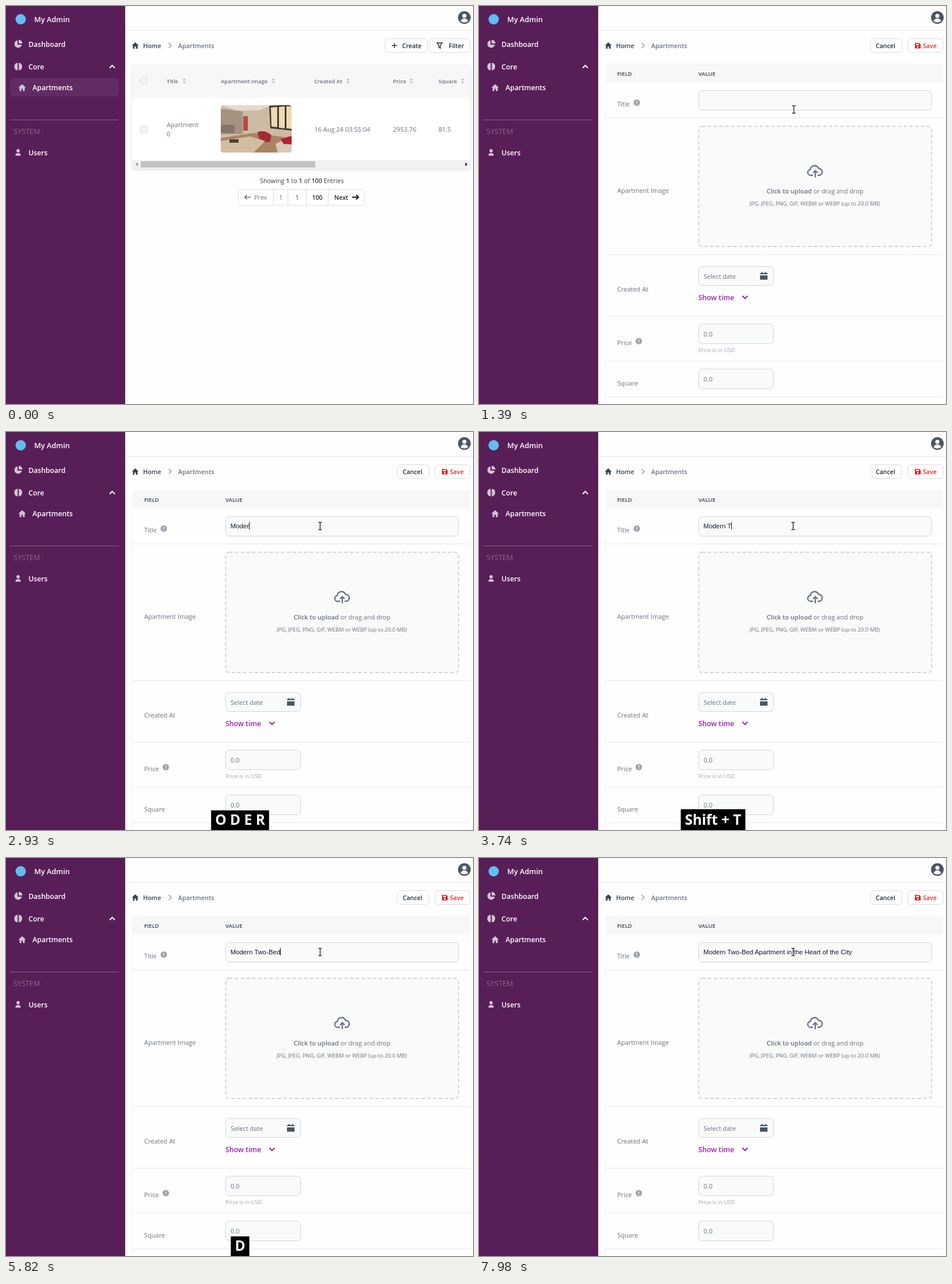
Recreate the animation shown at these times as an HTML page. Size 811 by 690 pixels, loop 8 s.

```html
<!DOCTYPE html>
<html lang="en">
<head>
<meta charset="utf-8">
<title>My Admin</title>
<style>
  html, body { margin: 0; width: 100%; height: 100%; overflow: hidden; background: #fefefe; }
  svg { display: block; }
  text { font: 11px "Open Sans", sans-serif; fill: #6b7280; white-space: pre; }
  .side text { font-size: 12.2px; font-weight: 600; fill: #fff; }
  .side .brand { font-size: 12.7px; }
  .side .section { font-size: 12.6px; font-weight: 500; fill: #8f628f; }
  .crumb { font-size: 10.9px; font-weight: 600; }
  .head text { font-size: 9.6px; font-weight: 600; }
  .dark, .dark text { fill: #374151; }
  .btn rect { fill: #fff; stroke: #d9dce1; }
  .btn text { font-size: 10.6px; font-weight: 600; fill: #1f2937; }
  .btn path { fill: none; stroke: #1f2937; stroke-width: 1.4; }
  .btn.red text { fill: #dc2626; }
  .btn.hover rect { fill: #f3f4f6; stroke: #d1d5db; stroke-width: 2; }
  .btn.hover text { fill: #a21caf; }
  .btn.hover path { stroke: #a21caf; }
  .strong { font-weight: 600; }
  .small { font-size: 9.45px; }
  .field { fill: #f9fafa; stroke: #d1d5db; }
  .lines { stroke: #eceef0; stroke-width: 1.5; }
  #title { font: 11.4px "Liberation Sans", Arial, sans-serif; fill: #111827; }
  #keyText { font-size: 24.5px; font-weight: 700; fill: #fff; text-anchor: middle; }
</style>
</head>
<body>
<svg width="811" height="690" viewBox="0 0 811 690">
  <defs>
    <g id="sort" fill="#c3c5ca"><path d="M-3-1 0-5 3-1zM-3 1 0 5 3 1z"/></g>
    <g id="info"><circle r="5.6" fill="#9ca3af"/><path d="M0-3V.8M0 2V3.3" stroke="#fff" stroke-width="1.4"/></g>
    <path id="house" d="M0-6-6.5 0h2v6h3.2V2h2.6v4h3.2V0h2z"/>
    <clipPath id="photoClip"><rect x="373" y="172" width="123" height="82" rx="5"/></clipPath>
    <filter id="shadow" x="-5%" y="-5%" width="110%" height="115%"><feDropShadow dx="0" dy="2" stdDeviation="2.5" flood-opacity=".14"/></filter>
  </defs>
  <rect width="811" height="690" fill="#fefefe"/>
  <path d="M207 42.5H811" stroke="#e5e7eb"/>
  <g transform="translate(796 20)">
    <circle r="11" fill="#4b5563"/>
    <circle cy="-3" r="3.6" fill="#fff"/><path d="M-6.5 6.2C-5-.2 5-.2 6.5 6.2Q0 11-6.5 6.2" fill="#fff"/>
  </g>

  <g class="side">
    <rect width="207" height="690" fill="#581e58"/>
    <rect id="active" x="7" y="125" width="189" height="32" rx="6" fill="#632b63"/>
    <circle cx="25.500" cy="23" r="9" fill="#62bdf0"/>
    <g fill="#d3c3d3">
      <path d="M20 59.500V67H27.500A6.500 6.500 0 1 1 20 59.500zM22 58.500A6.500 6.500 0 0 1 28.500 65H22z"/>
      <path d="M20.300 98.500V111.500C12.500 111.500 12.500 98.500 20.300 98.500zM22.300 98.500V111.500C30 111.500 30 98.500 22.300 98.500z"/>
      <use href="#house" x="28" y="141.500"/>
      <circle cx="21" cy="251" r="2.900"/><path d="M16.500 259.500V258Q16.500 255 21 255T25.500 258V259.500z"/>
    </g>
    <path d="M180 107.500 184.500 103 189 107.500" fill="none" stroke="#fff" stroke-width="2"/>
    <path d="M7 197.500H196" stroke="#8b5f8b"/>
    <text class="brand" x="49" y="27.700">My Admin</text>
    <text x="39" y="70.500">Dashboard</text>
    <text x="39" y="109.800">Core</text>
    <text x="46" y="146">Apartments</text>
    <text class="section" x="13" y="222">SYSTEM</text>
    <text x="39" y="258.500">Users</text>
  </g>

  <use href="#house" x="224.500" y="68.500" fill="#374151" transform="translate(22.450 6.850) scale(.9)"/>
  <text class="crumb dark" x="238" y="72.500">Home</text>
  <path d="M282.500 64 287 68.500 282.500 73" fill="none" stroke="#9ca3af" stroke-width="1.600"/>
  <text class="crumb" x="299" y="72.500">Apartments</text>

  <g id="listPage">
    <g class="btn" id="create">
      <rect x="658" y="56.500" width="74" height="24" rx="6"/>
      <path d="M670 68.500H679M674.500 64V73"/>
      <text x="688" y="72.500">Create</text>
    </g>
    <g class="btn">
      <rect x="736" y="56.500" width="70" height="24" rx="6"/>
      <path d="M748.500 64H757.500L754.300 68.500V73L751.700 71.500V68.500z"/>
      <text x="769" y="72.500">Filter</text>
    </g>
    <g filter="url(#shadow)">
      <rect x="219.500" y="101" width="586.500" height="180.500" rx="5" fill="#fff"/>
    </g>
    <path d="M219.500 159V106Q219.500 101 224.500 101H801Q806 101 806 106V159z" fill="#f7f7f7"/>
    <g fill="#f3f4f6" stroke="#d5d8dd">
      <rect x="233.500" y="123.500" width="12" height="12" rx="3"/>
      <rect x="233.500" y="207.500" width="12" height="12" rx="3"/>
    </g>
    <g class="head">
      <text x="279" y="134">Title</text><use href="#sort" x="309.500" y="130"/>
      <text x="373" y="134">Apartment Image</text><use href="#sort" x="464.500" y="130"/>
      <text x="535" y="134">Created At</text><use href="#sort" x="594" y="130"/>
      <text x="672" y="134">Price</text><use href="#sort" x="704" y="130"/>
      <text x="751" y="134">Square</text><use href="#sort" x="793" y="130"/>
    </g>
    <text x="279" y="209.500">Apartment</text>
    <text x="279" y="226">0</text>
    <text x="535.500" y="217.500">16 Aug 24 03:55:04</text>
    <text x="672" y="217.500">2953.76</text>
    <text x="751" y="217.500">81.5</text>

    <g clip-path="url(#photoClip)">
      <rect x="373" y="172" width="123" height="82" fill="#cdbba5"/>
      <path d="M373 172H460L440 181H400z" fill="#e4dacd"/>
      <path d="M373 178 411 183V222H373z" fill="#a39380"/>
      <path d="M373 206H397V220H373z" fill="#84776a"/>
      <path d="M373 229 430 220 496 229V254H373z" fill="#a98464"/>
      <path d="M457 173 496 171V216L459 212z" fill="#49382f"/>
      <path d="M460 176 471 175V210L461 209zM474 175 484 174V212L474 211zM487 174H496V213L487 212z" fill="#ecd9b5"/>
      <path d="M412 191H420V216H412z" fill="#b34b45"/>
      <path d="M436 219Q449 213 461 224L458 236 442 235z" fill="#a52a32"/>
      <path d="M373 234 424 226 450 234 430 254H373z" fill="#d3bda2"/>
      <path d="M468 239 496 225V254H472z" fill="#d9c8b8"/>
      <path d="M477 231 496 225V240L482 239z" fill="#b32035"/>
      <path d="M388 231H404V237H388z" fill="#514235"/>
    </g>

    <rect x="219.500" y="267" width="586.500" height="14.500" fill="#f1f1f1"/>
    <rect x="234" y="269" width="303" height="11" fill="#c1c1c1"/>
    <path d="M229 271.500V277.500L225 274.500z" fill="#8b8b8b"/><path d="M797.500 271V278L801.500 274.500z" fill="#333"/>

    <text class="dark" x="441" y="307" style="font-size:10.800px">Showing <tspan class="strong">1</tspan> to <tspan class="strong">1</tspan> of <tspan class="strong">100</tspan> Entries</text>
    <rect x="403.500" y="318.500" width="219" height="27" rx="3" fill="#fff" stroke="#dcdfe5"/>
    <path d="M464.500 318V346M489.500 318V346M521.500 318V346M559.500 318V346" stroke="#d5d8df"/>
    <g fill="none" stroke-width="1.600">
      <path d="M425 331.500H414.500M418.500 327.500 414.500 331.500 418.500 335.500" stroke="#6b7280"/>
      <path d="M601 331.500H612M608 327.500 612 331.500 608 335.500" stroke="#111827" stroke-width="2"/>
    </g>
    <text x="431" y="335.500">Prev</text>
    <text x="474" y="335.500">1</text>
    <text class="dark" x="502.500" y="335.500">1</text>
    <g class="btn"><text x="531.500" y="335.500">100</text><text x="570" y="335.500">Next</text></g>
  </g>

  <g id="formPage">
    <g class="btn"><rect x="679.500" y="56.500" width="55" height="24" rx="6"/><text x="689" y="72.500">Cancel</text></g>
    <g class="btn red">
      <rect x="745" y="56.500" width="61" height="24" rx="6"/><text x="771" y="72.500">Save</text>
    </g>
    <path d="M757 64H764.500L767 66.500V73.500H757zM759 65.500V68H764V65.500zM762 69.500A1.400 1.400 0 1 0 762 72.300 1.400 1.400 0 0 0 762 69.500z" fill="#dc2626" fill-rule="evenodd"/>
    <path d="M219.500 133V104Q219.500 100 223.500 100H802Q806 100 806 104V133z" fill="#f7f7f7"/>
    <path d="M219.500 133V690" stroke="#f1f2f3"/>
    <path class="lines" d="M219 194H806M219 431H806M219 538H806M219 615.500H806M219 677.500H806"/>
    <g class="head dark"><text x="240" y="120.700">FIELD</text><text x="381" y="120.700">VALUE</text></g>
    <text x="240" y="174">Title</text><use href="#info" x="274" y="167.500"/>
    <text x="240" y="323.500">Apartment Image</text>
    <text x="240" y="495">Created At</text>
    <text x="240" y="587.500">Price</text><use href="#info" x="277.500" y="581"/>
    <text x="240" y="657.500">Square</text>

    <g class="field">
      <rect x="381.500" y="146.500" width="404.500" height="34" rx="6"/>
      <rect x="381.500" y="208.500" width="404.500" height="208.500" rx="6" stroke-width="2" stroke-dasharray="6 4"/>
      <rect x="381.500" y="451.500" width="130" height="33" rx="6"/>
      <rect x="381.500" y="551.500" width="130" height="34" rx="6"/>
      <rect x="381.500" y="629.500" width="130" height="34" rx="6"/>
    </g>
    <g fill="none" stroke="#6b7280" stroke-width="2.300">
      <path d="M580 293.500H576.500A5 5 0 0 1 575.500 283.500C576 276 586 274 589.500 281.500A6 6 0 0 1 590.500 293.500H588"/>
      <path d="M584 297V286M580 289.500 584 285.500 588 289.500"/>
    </g>
    <text x="499.500" y="325"><tspan class="strong">Click to upload</tspan> or drag and drop</text>
    <text class="small" x="470" y="346">JPG, JPEG, PNG, GIF, WEBM or WEBP (up to 20.0 MB)</text>
    <text x="390" y="472.500">Select date</text>
    <path d="M488 465V463H490.500V461H492.500V463H496.500V461H498.500V463H501V465zM488 467H501V474.500H488z" fill="#4b5563"/>
    <text x="381" y="509.500" style="font-size:12.300px;font-weight:600;fill:#a21caf">Show time</text>
    <path d="M457.500 502.500 462 507 466.500 502.500" fill="none" stroke="#a21caf" stroke-width="2"/>
    <text x="390" y="572.500">0.0</text>
    <text class="small" x="381" y="600" style="fill:#9ca3af">Price is in USD</text>
    <text x="390" y="650.500">0.0</text>
    <text id="title" x="389.700" y="166.500"></text>
    <rect id="caret" y="156" width="1" height="13" fill="#111"/>
  </g>

  <g id="keys"><rect id="keyBox"/><text id="keyText" x="406.500"></text></g>

  <g id="cursor">
    <path id="arrow" d="M0 0V16L3.700 12.600 6.200 18.300 8.700 17.200 6.200 11.700H11.200z" fill="#fff" stroke="#000"/>
    <path id="hand" d="M-1.500 10V1.500Q0-1.500 1.500 1.500V7L4.500 7.600 7.500 8.700Q9 9.500 9 11.500L7.500 17V19H-1V17L-5.500 11.500Q-6-.5 9.500-1.500 12" transform="translate(1)" fill="#fff" stroke="#000" stroke-width="1.100"/>
    <path id="beam" d="M-3-6.500H-1.200L0-5.500 1.200-6.500H3M0-5.500V5.500M-3 6.500H-1.200L0 5.500 1.200 6.500H3" fill="none" stroke="#000" stroke-width="1.100"/>
  </g>
</svg>
<script>
const LOOP = 8000, FORM_OPENS = 1090, PASTE = 6960, PASTE_CARET = 7110;
const $ = id => document.getElementById(id);
const show = (id, on) => $(id).style.display = on ? '' : 'none';

const typed = 'Modern Two-Bed ', pasted = 'Apartment in the Heart of the City';
const typeTimes = [1990, 2330, 2530, 2670, 2930, 3120, 3530, 3740, 4000, 4080, 4260, 4810, 5300, 5820, 6100];
const caretSpans = [[1590, 5950], [6100, PASTE_CARET], [7370, 7890]];

const keyStates = [
  [0, ''], [1990, 'Shift + M'], [2330, 'Shift + M O'], [2450, 'Shift + M O D'], [2670, 'Shift + M O D E'],
  [2930, 'O D E R'], [3120, 'D E R N'], [3530, 'D E R N Space'], [3740, 'Shift + T'],
  [4000, 'Shift + T W'], [4080, 'Shift + T W O'], [4260, 'W O -'], [4350, 'O -'], [4580, ''],
  [4810, 'Shift + B'], [5300, 'Shift + B E'], [5410, 'E'], [5820, 'D'], [6100, 'D Space'],
  [6490, 'Space'], [6670, ''], [7400, 'End'], [7980, '']
];

// time, x, y
const mousePath = [
  [150, 284, 622], [500, 560, 330], [700, 766, 130], [880, 697, 84],
  [1040, 697, 84], [1190, 547, 182], [1330, 547, 182], [1590, 545.5, 163]
];

function mouseAt(t) {
  const i = mousePath.findIndex(p => p[0] > t);
  if (i < 0) return mousePath.at(-1).slice(1);
  if (i === 0) return mousePath[0].slice(1);
  const [t0, x0, y0] = mousePath[i - 1], [t1, x1, y1] = mousePath[i];
  const k = (t - t0) / (t1 - t0), e = k * k * (3 - 2 * k);
  return [x0 + (x1 - x0) * e, y0 + (y1 - y0) * e];
}

function drawMouse(t) {
  const [x, y] = mouseAt(t), form = t >= FORM_OPENS;
  const onCreate = !form && t >= 150 && x > 658 && x < 732 && y > 56 && y < 86;
  const onTitle = form && x > 381 && x < 786 && y > 146 && y < 180;
  show('cursor', t >= 150);
  show('hand', onCreate);
  show('beam', onTitle);
  show('arrow', !onCreate && !onTitle);
  $('cursor').setAttribute('transform', `translate(${x} ${y})`);
  $('create').classList.toggle('hover', onCreate);
}

function drawTitle(t) {
  const title = $('title');
  title.textContent = typed.slice(0, typeTimes.filter(s => s <= t).length);
  const typedWidth = title.getComputedTextLength();
  if (t >= PASTE) title.textContent += pasted;
  const width = t < PASTE_CARET ? typedWidth : title.getComputedTextLength();
  $('caret').setAttribute('x', Math.round(389.7 + width));
  show('caret', caretSpans.some(([a, b]) => t >= a && t < b));
}

function drawKeys(t) {
  const label = keyStates.findLast(k => k[0] <= t)[1];
  show('keys', label);
  if (!label) return;
  const text = $('keyText'), descends = label.includes('p');
  text.textContent = label;
  text.setAttribute('y', descends ? 675 : 681);
  const width = text.getComputedTextLength() + 14;
  const top = descends ? 650 : /[a-z]/.test(label) ? 654 : 656;
  const box = { x: 406.5 - width / 2, y: top, width, height: 690 - top };
  for (const name in box) $('keyBox').setAttribute(name, box[name]);
}

function draw(now) {
  const t = now % LOOP, form = t >= FORM_OPENS;
  show('listPage', !form);
  show('active', !form);
  show('formPage', form);
  drawMouse(t);
  drawTitle(t);
  drawKeys(t);
  requestAnimationFrame(draw);
}
requestAnimationFrame(draw);
</script>
</body>
</html>
```
